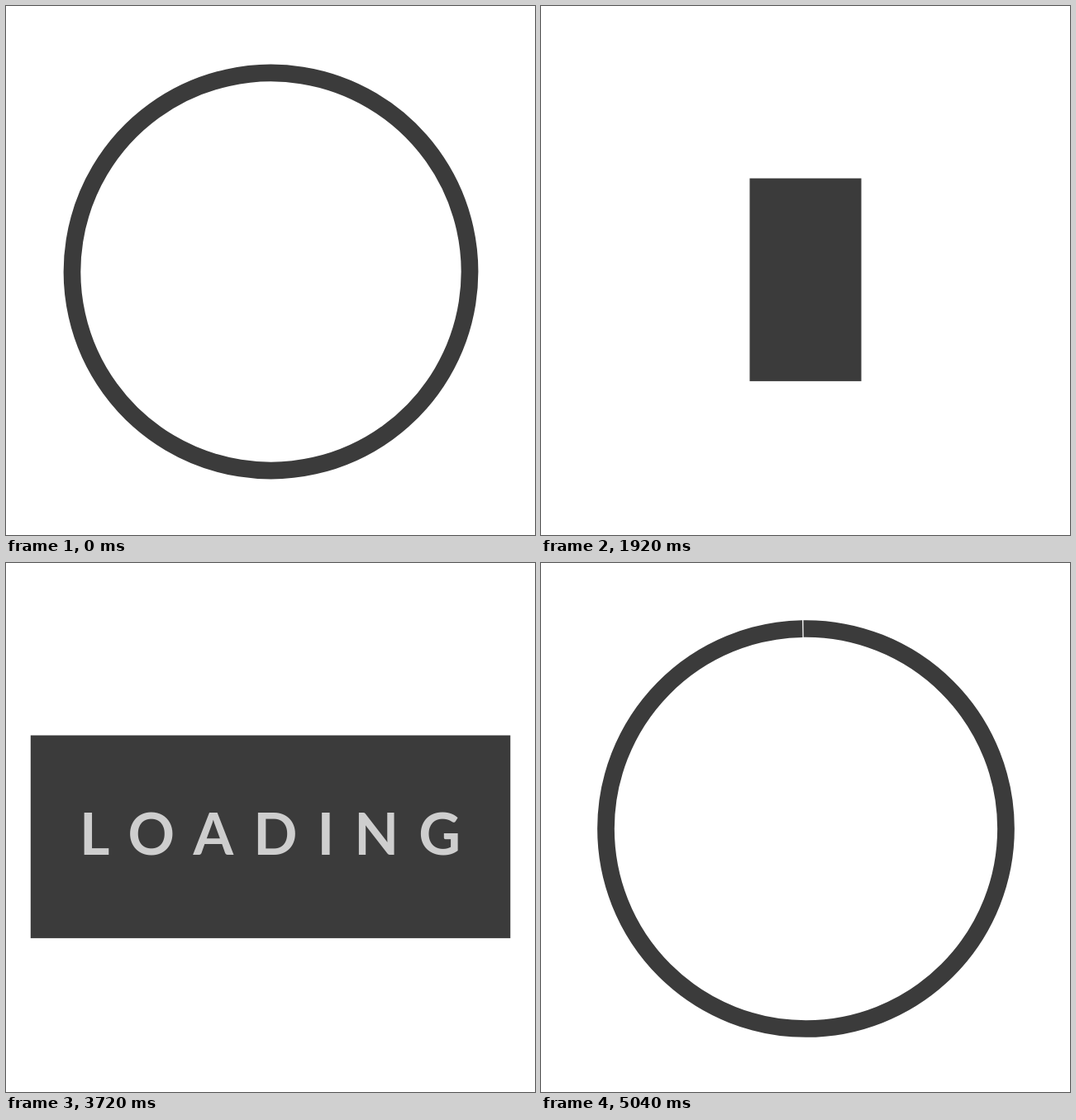
Recreate the animation shown at these times as an HTML page. Size 640 by 640 pixels, loop 5.08 s.

```html
<!DOCTYPE html>
<html lang="en">
<head>
<meta charset="utf-8">
<title>Loading</title>
<style>
  html, body { margin: 0; width: 100%; height: 100%; overflow: hidden; background: #fff; }
  svg { display: block; width: 100vw; height: 100vh; }
  path { fill: none; stroke: #3b3b3b; stroke-width: 20.7; }
  rect { fill: #3b3b3b; }
  text { font: 700 70px Lato, sans-serif; fill: #fff; }
</style>
</head>
<body>
<svg viewBox="0 0 640 640">
  <path id="leave"/>
  <path id="enter"/>
  <rect id="panel" y="208.5" height="245.4"/>
  <g id="word"></g>
</svg>
<script>
const LOOP = 5080, STEP = 40;
const CX = 320.5, CY = 321.5, R_LEAVE = 240.5, R_ENTER = 242;
const BAR = 245, BAR_WIDTH = 21, PANEL_WIDTH = 591, PANEL_PEAK = 614;
const WORD = 'LOADING', TRACKING = 24, BASELINE = 352.5, WORD_CENTER = 319.5;

const el = id => document.getElementById(id);
const clamp = v => Math.min(1, Math.max(0, v));
const mix = (a, b, u) => a + (b - a) * u;
const span = (t, from, to) => clamp((t - from) / (to - from));
const inOut = u => u < 0.5 ? 4 * u ** 3 : 1 - (2 - 2 * u) ** 3 / 2;
// S-curve with separate softness at its start and end.
const sCurve = (u, a, b) => u ** a / (u ** a + (1 - u) ** b);
const lap = r => 2 * Math.PI * r;

function point(r, deg) {
  const a = deg * Math.PI / 180;
  return `${CX + r * Math.cos(a)} ${CY + r * Math.sin(a)}`;
}

// Clockwise turn around the circle in arcs of at most 90 degrees.
function turn(r, from, to) {
  let d = '';
  while (from < to) {
    from = Math.min(from + 90, to);
    d += `A${r} ${r} 0 0 1 ${point(r, from)}`;
  }
  return d;
}

function setPath(id, d) {
  el(id).setAttribute('d', d);
  return el(id).getTotalLength();
}

const leaveLength = setPath('leave', `M${point(R_LEAVE, -81)}` + turn(R_LEAVE, -81, 720)
  + `A150 214.5 0 0 1 411 536A90.5 101 0 0 1 ${CX} 435V205`);
const enterLength = setPath('enter', `M${CX} 453V208A89.5 102 0 0 1 410 106`
  + `A152.5 215.5 0 0 1 ${CX + R_ENTER} ${CY}` + turn(R_ENTER, 0, 629));

function trim(id, tail, head) {
  el(id).style.strokeDasharray = `0 ${tail} ${head - tail} 9999`;
}

function drawLeave(t) {
  const u = span(t, 80, 1760);
  trim('leave', mix(0, leaveLength - BAR - 3, sCurve(u, 1.151, 2.283)),
    mix(lap(R_LEAVE) + 2, leaveLength, sCurve(u, 2.064, 2.446)));
}

function drawEnter(t) {
  trim('enter', mix(0, enterLength - lap(R_ENTER), sCurve(span(t, 3920, 4800), 2.06, 1.5)),
    mix(BAR, enterLength, sCurve(span(t, 3920, 5040), 2.04, 1.66)));
}

// Letters follow the font's own widths and kerning, plus even tracking.
const pen = document.createElement('canvas').getContext('2d');
pen.font = '700 70px Lato, sans-serif';
const width = s => pen.measureText(s).width;
const wordLeft = WORD_CENTER - (width(WORD) + TRACKING * (WORD.length - 1)) / 2;
const letters = [...WORD].map((char, i) => {
  const node = document.createElementNS('http://www.w3.org/2000/svg', 'text');
  const x = wordLeft + width(WORD.slice(0, i + 1)) - width(char) + TRACKING * i;
  node.textContent = char;
  node.setAttribute('x', x);
  el('word').append(node);
  return node;
});

function drawPanel(t) {
  const w = mix(BAR_WIDTH, PANEL_PEAK, inOut(span(t, 1760, 2200)))
    - (PANEL_PEAK - PANEL_WIDTH) * inOut(span(t, 2200, 2320))
    - (PANEL_WIDTH - BAR_WIDTH) * inOut(span(t, 3680, 3920));
  el('panel').setAttribute('x', 320 - w / 2);
  el('panel').setAttribute('width', w);

  const fade = 1 - span(t, 3680, 3840);
  letters.forEach((node, i) => {
    const age = t - 2200 - 60 * i;
    node.setAttribute('y', BASELINE + 20 * (1 - inOut(clamp(age / 280))));
    node.setAttribute('opacity', clamp(age / 120) * fade);
  });
}

function draw(t) {
  const scene = t < 1800 ? 'leave' : t < 3920 ? 'panel' : 'enter';
  for (const id of ['leave', 'panel', 'enter']) el(id).style.display = id === scene ? '' : 'none';
  el('word').style.display = el('panel').style.display;
  ({ leave: drawLeave, panel: drawPanel, enter: drawEnter })[scene](t);
}

const start = performance.now();
function tick() {
  const t = (performance.now() - start) % LOOP;
  draw(Math.floor(t / STEP) * STEP);
  requestAnimationFrame(tick);
}
tick();
</script>
</body>
</html>
```
